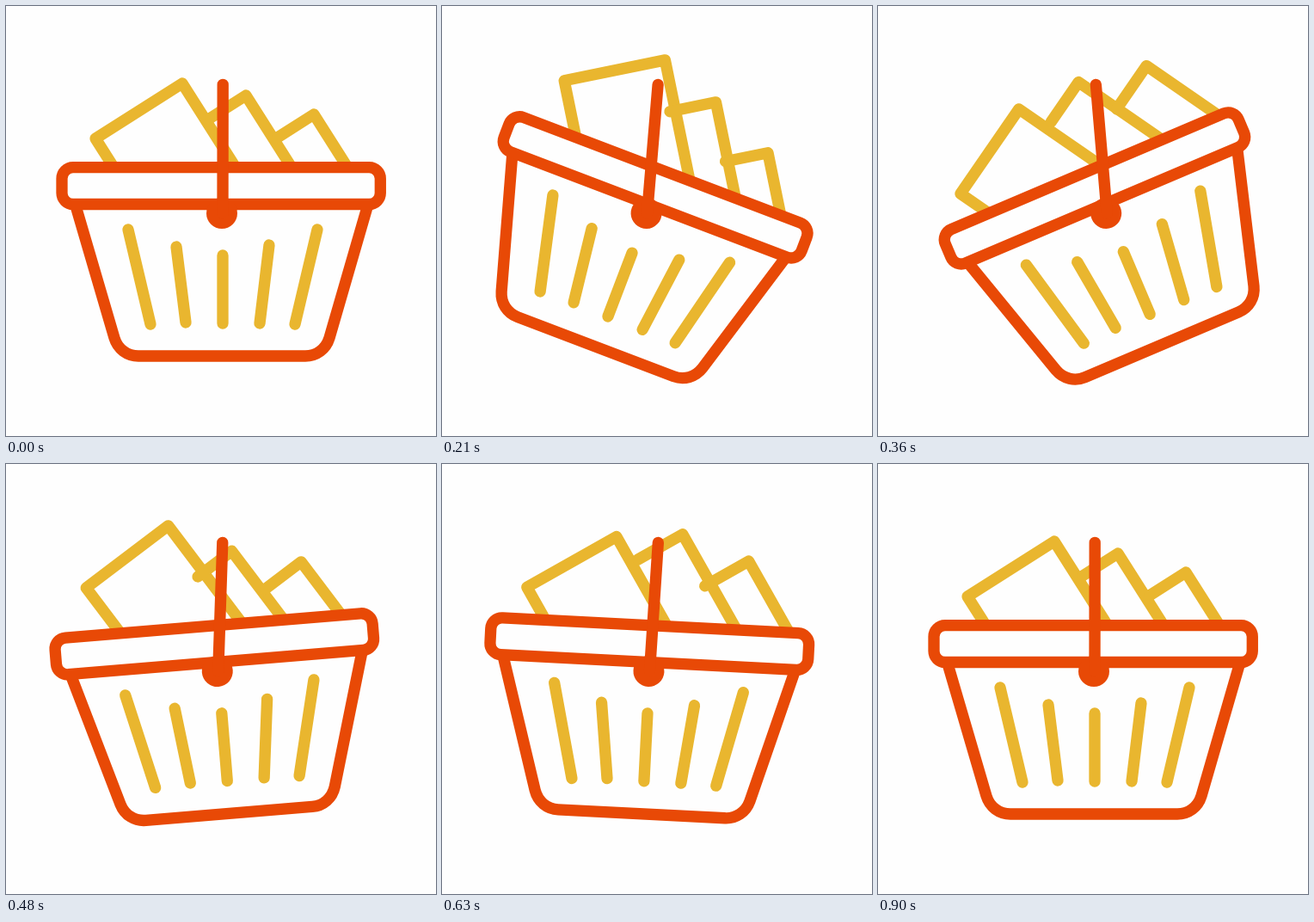
An HTML page for the animation above (960 ms loop, 500 px wide and 500 px high).

```html
<!DOCTYPE html>
<html lang="en">
<head>
<meta charset="utf-8">
<title>Swinging basket</title>
<style>
  html, body { margin: 0; width: 100%; height: 100%; overflow: hidden; background: #fefefe; }
  svg { display: block; width: 100vw; height: 100vh; }
  .red, .gold { fill: none; stroke-width: 13.3; stroke-linecap: round; stroke-linejoin: round; }
  .red { stroke: #e84906; }
  .gold { stroke: #e9b62f; }
  .solid { fill: #fefefe; }
</style>
</head>
<body>
<svg viewBox="0 0 500 500">
  <g id="basket">
    <g id="papers" class="gold"></g>
    <path class="red solid" d="M81.5 234L126 386C130 399 141 407 154 407H348C361 407 372 399 376 386L420 234"/>
    <path class="gold" d="M142 260L168 370M198 280L209 368M252 290V369M306 278L295 369M362 260L336 370"/>
    <rect class="red solid" x="65" y="187.7" width="370.3" height="42.8" rx="13"/>
    <circle cx="251" cy="241" r="18" fill="#e84906"/>
  </g>
  <line id="handle" class="red" y1="91.3" y2="241"/>
</svg>
<script>
const LOOP = 960, STEP = 30;
const PIN = { x: 251, y: 241 };

// Turning points of the swing: time, tilt in degrees, sideways shift.
const SWING = [
  [0, 0, 0], [185, 23, -14.8], [365, -23.1, 14.3],
  [570, 7.8, -18.5], [710, -4.7, 2], [900, 0, 0]
];

// Each paper hops twice, the second time a little quicker.
const HOP = { height: 24.5, first: 335, second: 315 };

// Peak corner, length of the top edge, and how late the paper starts to hop.
const PAPERS = [
  { x: 205, y: 90, top: 119.6, delay: 18, side: true },
  { x: 279, y: 104, top: 49, delay: 125 },
  { x: 358, y: 126, top: 50, delay: 188 }
];
const SLANT = 32.4 * Math.PI / 180, FLOOR = 217;
const COS = Math.cos(SLANT), SIN = Math.sin(SLANT), TAN = SIN / COS;

function swing(t) {
  const i = SWING.findIndex(key => key[0] > t);
  if (i < 0) return [0, 0];
  const [t0, ...a] = SWING[i - 1], [t1, ...b] = SWING[i];
  const ease = (1 - Math.cos(Math.PI * (t - t0) / (t1 - t0))) / 2;
  return a.map((v, k) => v + (b[k] - v) * ease);
}

function hop(t) {
  const turn = t < HOP.first ? t / HOP.first : 1 + (t - HOP.first) / HOP.second;
  return turn < 0 || turn > 2 ? 0 : HOP.height * Math.sin(Math.PI * turn) ** 2;
}

// The top edge of a paper standing behind another grows as it rises.
function outline({ x, y, top, side }, lift) {
  const len = side ? top : top + lift * 0.45;
  const left = x - len * COS, low = y + len * SIN;
  const start = side ? `${left + (FLOOR - low) * TAN} ${FLOOR}L` : '';
  return `M${start}${left} ${low}L${x} ${y}L${x + (FLOOR - y) * TAN} ${FLOOR}`;
}

const basket = document.getElementById('basket');
const handle = document.getElementById('handle');
const shapes = PAPERS.map(() => {
  const path = document.createElementNS('http://www.w3.org/2000/svg', 'path');
  return document.getElementById('papers').appendChild(path);
});

function draw(ms) {
  const t = Math.floor(ms % LOOP / STEP) * STEP;
  const [tilt, dx] = swing(t);
  basket.setAttribute('transform', `translate(${dx} 0) rotate(${tilt} ${PIN.x} ${PIN.y})`);
  PAPERS.forEach((paper, i) => {
    const lift = hop(t - paper.delay);
    shapes[i].setAttribute('d', outline(paper, lift));
    shapes[i].setAttribute('transform', `translate(${lift * 0.13} ${-lift})`);
  });
  handle.setAttribute('x1', 252.2 + dx * 0.08);
  handle.setAttribute('x2', PIN.x + 1 + dx);
}

let start;
function tick(now) {
  start ??= now;
  draw(now - start);
  requestAnimationFrame(tick);
}
draw(0);
requestAnimationFrame(tick);
</script>
</body>
</html>
```
